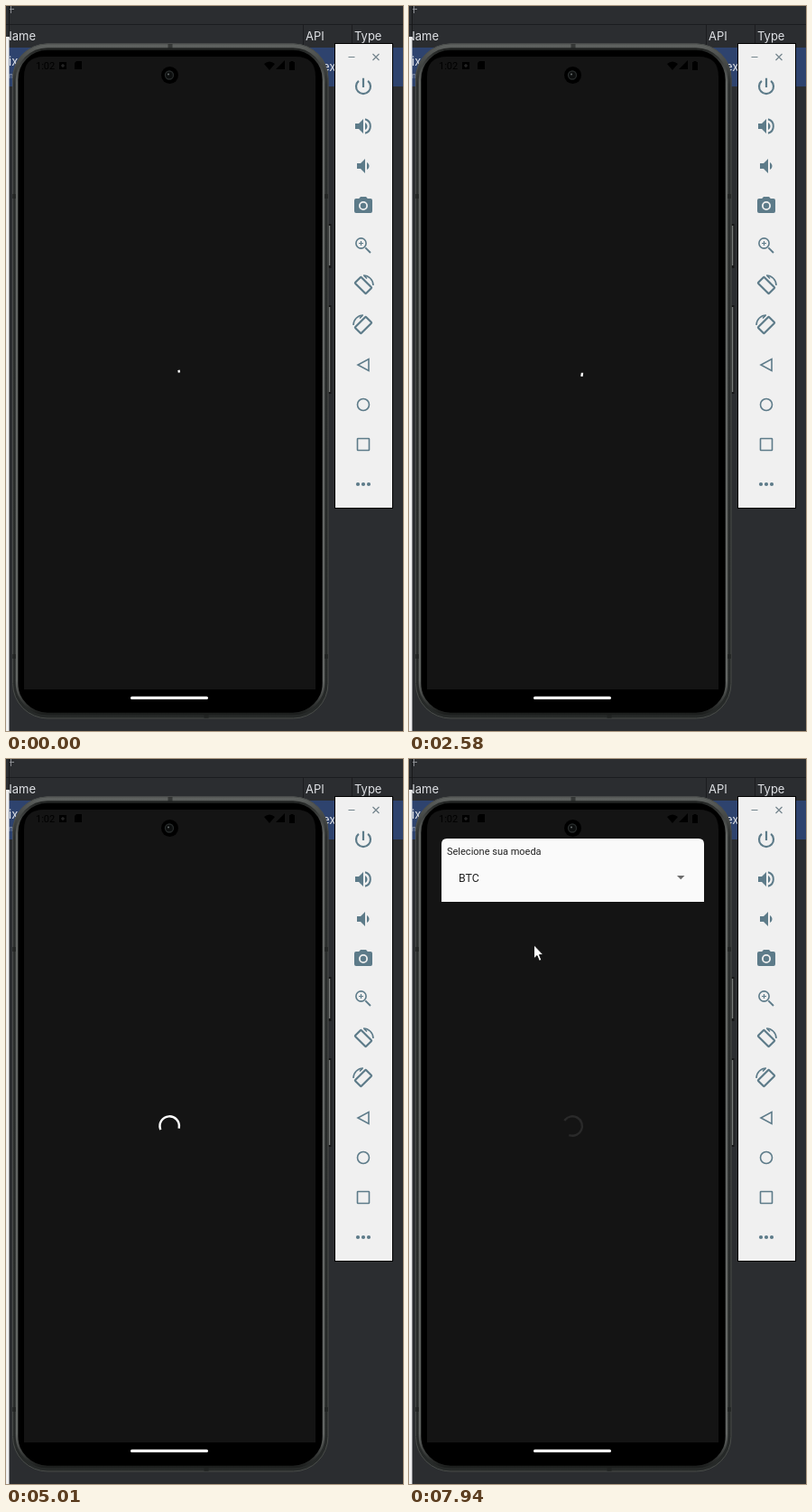
These frames come from a looping animation (440 by 802 pixels, 8 s). An HTML page:

```html
<!DOCTYPE html>
<html lang="pt">
<head>
<meta charset="utf-8">
<title>Emulator loading</title>
<style>
  html, body { margin: 0; width: 100%; height: 100%; overflow: hidden; background: #2b2d30; }
  svg { display: block; }
  .ide { font: 13px Inter, sans-serif; fill: #dfe1e5; }
  .app { font: 11px Roboto, sans-serif; fill: #222; }
  .line { fill: none; stroke: #5d7b89; stroke-width: 1.6; }
</style>
</head>
<body>
<svg width="440" height="802" viewBox="0 0 440 802">
  <defs>
    <linearGradient id="rim" x1="0" y1="0" x2="0" y2="1">
      <stop offset="0" stop-color="#626563"/>
      <stop offset=".01" stop-color="#555856"/>
      <stop offset=".06" stop-color="#2b2e2d"/>
      <stop offset="1" stop-color="#262928"/>
    </linearGradient>
    <linearGradient id="edge" x1="0" y1="0" x2="0" y2="1">
      <stop offset="0" stop-color="#222423"/>
      <stop offset=".05" stop-color="#626563"/>
      <stop offset=".95" stop-color="#626563"/>
      <stop offset="1" stop-color="#1c1e1d"/>
    </linearGradient>
  </defs>

  <!-- IDE window -->
  <rect width="440" height="802" fill="#2b2d30"/>
  <path d="M4 3.5H9M5.5 0V8" stroke="#8a8c90"/>
  <path d="M0 20.5H440M329.5 21V46M383.5 21V46" stroke="#1b1c1f"/>
  <rect y="46" width="440" height="43" fill="#2e436e"/>
  <g class="ide">
    <text x="-3" y="38">Name</text>
    <text x="332" y="38">API</text>
    <text x="386" y="38">Type</text>
    <text x="3" y="66">ix</text>
    <text x="351" y="72">ex</text>
    <text x="3" y="80" font-size="9" opacity=".6">m</text>
  </g>
  <rect y="21" width="3.5" height="13" fill="#2b2d30"/>
  <path d="M3.5 0V34" stroke="#17181a"/>
  <rect y="34" width="3.5" height="768" fill="#f0f0f0"/>

  <!-- Phone -->
  <path d="M358.5 241V290M358.5 331V429" stroke="#161717" stroke-width="4"/>
  <path d="M358.5 243V287M358.5 333V427" stroke="#777a78" stroke-width="1.6"/>
  <rect x="7" y="41.5" width="350.5" height="747" rx="39" fill="url(#rim)"/>
  <rect x="7.5" y="42" width="349.5" height="746" rx="38.5" fill="none" stroke="#4a4d4b"/>
  <rect x="12" y="47.5" width="340" height="735.5" rx="34" stroke="url(#edge)" stroke-width="2.6"/>
  <path d="M7 210.5H11M353 210.5H357M7 719.5H11M353 719.5H357M182 42V47M222 784V788" stroke="#1d1f1e" stroke-width="5" opacity=".6"/>
  <path d="M20 756V78Q20 56 42 56H321Q343 56 343 78V756Z" fill="#141414"/>
  <rect x="138" y="763.8" width="86" height="3.2" rx="1.6" fill="#fff"/>

  <!-- Status bar -->
  <text x="33" y="70" font-family="Roboto, sans-serif" font-size="11">1:02</text>
  <path d="M59 62h8v8h-8zM78 61h6v9h-8v-7zM286 64q6-5 12 0l-6 7zM299 70h10v-10zM314 62h1.5v-1h3v1h1.5v9h-6z"/>
  <path d="M61 66h4M63 64v4" stroke="#333"/>
  <circle cx="181.500" cy="76.500" r="9.500"/>
  <circle cx="181" cy="76.500" r="4.500" fill="#0d0f0f" stroke="#272b2b" stroke-width="1.300"/>
  <circle cx="180" cy="75.500" r="1" fill="#6a7171"/>

  <!-- Currency card -->
  <g id="card">
    <path d="M36 158V94Q36 88 42 88H321Q327 88 327 94V158Z" fill="#fafafa"/>
    <text class="app" x="42" y="106">Selecione sua moeda</text>
    <text class="app" x="55" y="135.500" style="font-size:12.300px">BTC</text>
    <path d="M297 129h8.500l-4.250 4.250z" fill="#6b6b6b"/>
  </g>

  <path id="spinner" fill="none" stroke="#fff" stroke-width="2.400" stroke-linecap="square"/>

  <!-- Emulator toolbar -->
  <rect x="364.5" y="41.5" width="64" height="514" fill="#f0f0f0" stroke="#000"/>
  <path d="M379.500 56.500H386.500M406.500 53l7 7m0-7l-7 7" stroke="#74858d" stroke-width="1.200"/>
  <g id="tools" fill="#5d7b89"></g>

  <path id="cursor" d="M.5 .8V15.800L4 12.500L6.400 18.300L8.800 17.300L6.400 11.600H10.800Z" fill="#fff" stroke="#000" stroke-width=".8"/>
</svg>
<script>
const LOOP = 8000, CARD_AT = 5980;
const byId = id => document.getElementById(id);
const spinner = byId('spinner'), card = byId('card'), cursor = byId('cursor');

// Toolbar icons, each in a 24 unit box
const speaker = x => `<path d="M${x} 9v6h4l5 5V4l-5 5zm13.500 3c0-1.770-1-3.290-2.500-4.030v8.050c1.480-.73 2.500-2.250 2.500-4.020z"/>`;
const turned = '<rect class="line" x="3.500" y="7.250" width="17" height="9.500" rx=".8" transform="rotate(45 12 12)" style="stroke-width:2.200"/>' +
  '<path class="line" d="M12 1A11 11 0 0 1 23 12M12.500 1l3.500 3.500"/>';
const icons = [
  '<path class="line" style="stroke-width:2.200" d="M12 2.800V13M6.900 5.900A8 8 0 1 0 17.100 5.900"/>',
  speaker(3) + '<path class="line" style="stroke-width:2" d="M14 4.300a8 8 0 0 1 0 15.400"/>',
  speaker(5),
  '<path fill-rule="evenodd" d="M9 2L7.200 4H4a2 2 0 0 0-2 2v12a2 2 0 0 0 2 2h16a2 2 0 0 0 2-2V6a2 2 0 0 0-2-2h-3.200L15 2zm3 15a5 5 0 1 1 0-10a5 5 0 0 1 0 10z"/><circle cx="12" cy="12" r="3.200"/>',
  '<path class="line" style="stroke-width:1.900" d="M14.300 14.300L20 20"/><circle class="line" cx="9.500" cy="9.500" r="5.600"/><path class="line" style="stroke-width:1.200" d="M7 9.500h5M9.500 7v5"/>',
  turned,
  `<g transform="translate(24 0) scale(-1 1)">${turned}</g>`,
  '<path class="line" d="M18 5.500V18.500L6 12z"/>',
  '<circle class="line" cx="12" cy="12" r="6.500"/>',
  '<rect class="line" x="5.500" y="5.500" width="13" height="13" rx=".5"/>',
  [6, 12, 18].map(x => `<circle cx="${x}" cy="12" r="2.100"/>`).join('')
];
byId('tools').innerHTML = icons
  .map((icon, i) => `<g transform="translate(384 ${77 + 44 * i})">${icon}</g>`).join('');

// cubic-bezier(.4, 0, .2, 1), solved by bisection
function ease(x) {
  if (x <= 0) return 0;
  if (x >= 1) return 1;
  let lo = 0, hi = 1, s;
  for (let i = 0; i < 20; i++) {
    s = (lo + hi) / 2;
    const r = 1 - s;
    if (1.2 * r * r * s + .6 * r * s * s + s * s * s < x) lo = s; else hi = s;
  }
  return s * s * (3 - 2 * s);
}

// Indeterminate ring: head runs in the first half of a cycle, tail in the second
function ringPath(t) {
  const cycles = (t * .956 + 44) / 1333;
  const turn = Math.floor(cycles), phase = cycles - turn;
  const head = 270 * ease(phase * 2), tail = 270 * ease(phase * 2 - 1);
  const base = -12 + .2194 * t + 270 * turn;
  const sweep = Math.max(head - tail, .5);
  const point = deg => {
    const a = deg * Math.PI / 180;
    return `${(181.2 + 10.7 * Math.cos(a)).toFixed(3)} ${(406 + 10.7 * Math.sin(a)).toFixed(3)}`;
  };
  return `M${point(base + tail)}A10.7 10.7 0 ${sweep > 180 ? 1 : 0} 1 ${point(base + tail + sweep)}`;
}

// The pointer is seen in short passes, moving in hops
const passes = [
  { start: 690, end: 1040, hops: 4, from: [414, 646], to: [24, 350], curve: p => p },
  { start: 6910, end: 6980, hops: 1, from: [98, 726], to: [98, 726], curve: p => p },
  { start: 7580, end: LOOP, hops: 5, from: [370, 756], to: [138, 205], curve: p => 1 - (1 - p) ** 1.5 }
];
function pointerAt(t) {
  const pass = passes.find(p => t >= p.start && t < p.end);
  if (!pass) return null;
  const hop = Math.min(pass.hops, Math.floor((t - pass.start) / 70));
  const k = pass.curve(hop / pass.hops);
  return pass.from.map((v, i) => v + (pass.to[i] - v) * k);
}

function draw(t) {
  const loaded = t >= CARD_AT;
  card.style.display = loaded ? '' : 'none';
  spinner.setAttribute('d', ringPath(Math.min(t, CARD_AT)));
  spinner.setAttribute('stroke', loaded ? '#2a2a2a' : '#fff');
  const pointer = pointerAt(t);
  cursor.style.display = pointer ? '' : 'none';
  if (pointer) cursor.setAttribute('transform', `translate(${pointer})`);
}

const began = performance.now();
function tick() {
  draw((performance.now() - began) % LOOP);
  requestAnimationFrame(tick);
}
draw(0);
requestAnimationFrame(tick);
</script>
</body>
</html>
```
